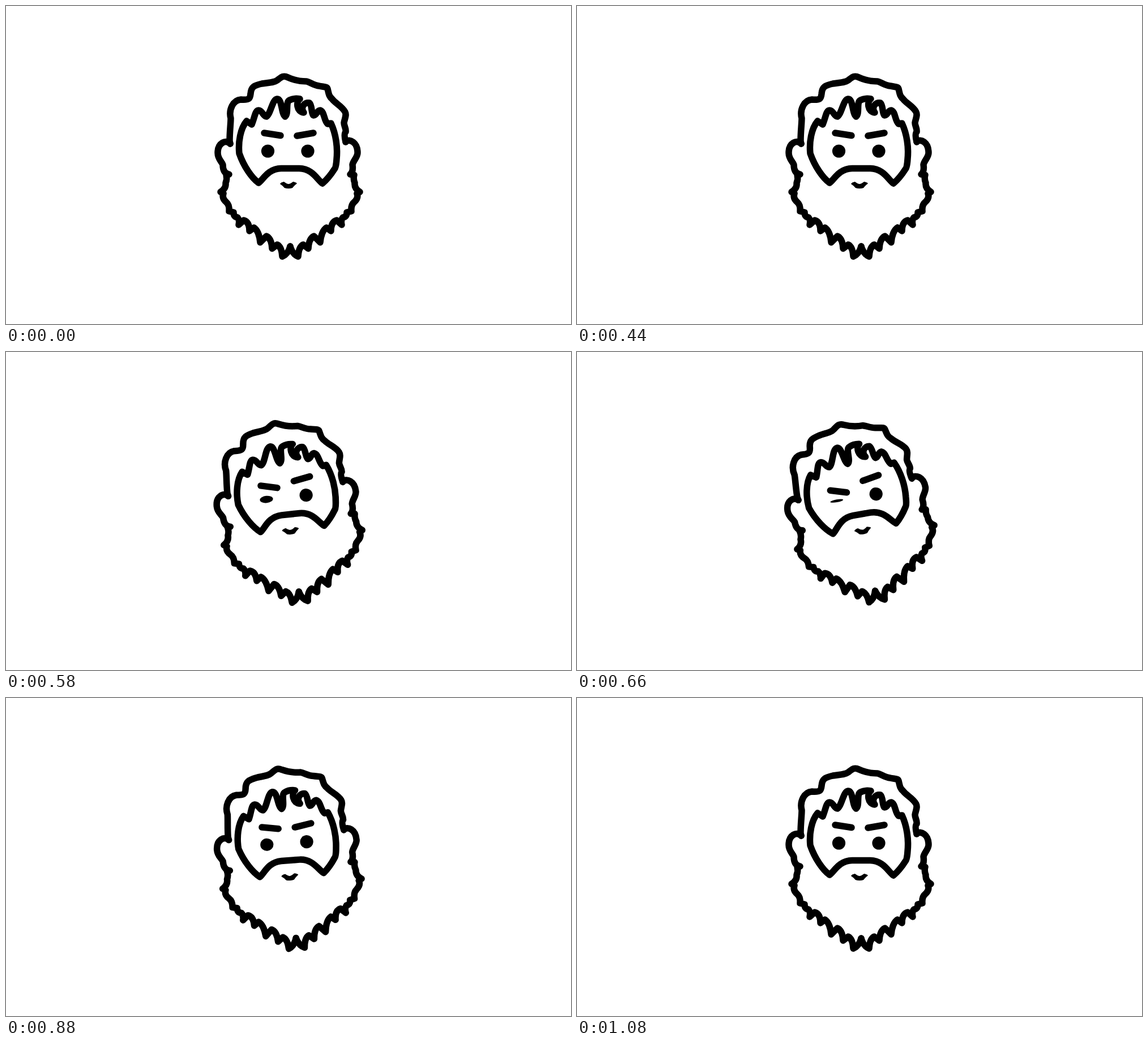
An HTML page that plays this animation: 998 px wide and 561 px high, repeating every 2 s.

```html
<!DOCTYPE html>
<html lang="en">
<head>
<meta charset="utf-8">
<title>Winking bearded man</title>
<style>
html, body { margin: 0; width: 100%; height: 100%; overflow: hidden; background: #fff; }
svg { display: block; width: 100vw; height: 100vh; }
.line { fill: none; stroke: #000; stroke-width: 11.5; stroke-linecap: round; stroke-linejoin: round; }
</style>
</head>
<body>
<svg viewBox="0 0 998 561">
  <g id="head">
    <g class="line">
      <path d="M396 243L395 238C395 222 397 207 397 198C393 183 401 166 415 165C429 166 431 164 432 155C433 142 439 140 452 137C464 135 474 135 479 131C487 125 490 122 498 126C509 131 520 133 531 133C538 135 544 140 553 141C562 143 567 142 568 146C570 154 570 159 576 164C582 172 594 177 599 187C602 193 598 199 597 206C597 212 601 216 600 222C597 225 598 232 600 240"/>
      <path d="M396 243C389 235 374 241 374 259C374 270 381 274 383 280C383 289 386 296 394 297"/>
      <path d="M600 239C607 234 621 240 621 259C621 267 613 273 612 280C613 287 613 293 608 297"/>
      <path d="M446 312C434 303 420 283 412 260C410 240 414 216 425 203L434 209C439 198 440 184 446 184C453 184 454 195 460 195C468 190 470 165 479 164C488 164 486 190 493 195C500 190 493 169 501 166C507 163 514 163 519 164C512 168 513 187 526 188C520 180 526 169 536 171C541 175 539 190 543 193C549 193 549 184 555 184C563 187 561 201 568 208L574 207C583 226 586 250 584 270Q583 286 580 288C573 299 566 307 559 313C550 307 542 287 518 286.500L486 286.500C462 287 454 307 446 312Z"/>
    </g>
    <g class="line" stroke-width="10">
      <path id="beard" d="M389 298Q391 305 388 312Q389 322 379 328L384 331Q381 339 389 346Q395 351 394 362L402 364Q402 372 409 373Q413 378 411 386L420 378Q430 381 430 397L438 391Q447 397 449 417L460 406Q469 410 470 428L479 421Q487 425 488 442Q498 438 502 424"/>
      <use href="#beard" transform="matrix(-1 0 0 1 1004 0)"/>
    </g>
    <path d="M484 314Q485 311 491 310Q496 314 499 314Q502 314 507 310Q513 311 514 313Q509 317 506 321Q503 322 499 322Q495 322 492 321Q489 317 484 314Z"/>
    <path id="brow" class="line" stroke-width="12" d="M456 224L485 228.500"/>
    <path class="line" stroke-width="12" d="M514 229L543 224"/>
    <circle id="eye" cx="462.500" cy="256" r="11.600"/>
    <circle cx="533" cy="256" r="11.600"/>
  </g>
</svg>
<script>
const LOOP = 2000;
const [head, brow, eye] = ['head', 'brow', 'eye'].map(id => document.getElementById(id));

// Steps: [time, value, slope per ms]
const tilt = [[435, 0, 0], [580, 6.1, .056], [672, 10, 0], [800, 7.1, -.037], [980, 1.2, -.021], [1085, 0, 0]];
const wink = [[435, 0, 0], [580, .57, .0062], [668, 1, 0], [800, .36, -.0045], [930, 0, 0]];

function sample(steps, t) {
  if (t <= steps[0][0]) return steps[0][1];
  for (let i = 1; i < steps.length; i++) {
    const [t0, a, va] = steps[i - 1], [t1, b, vb] = steps[i];
    if (t > t1) continue;
    const d = t1 - t0, u = (t - t0) / d, w = 1 - u;
    return w * w * ((1 + 2 * u) * a + u * d * va) + u * u * ((3 - 2 * u) * b - w * d * vb);
  }
  return steps[steps.length - 1][1];
}

function draw(now) {
  const t = now % LOOP, w = sample(wink, t);
  head.setAttribute('transform', `rotate(${-sample(tilt, t)} 499 281)`);
  brow.setAttribute('transform', `translate(${-2 * w} ${14 * w}) rotate(${8 * w} 470.5 226)`);
  eye.setAttribute('transform', `translate(0 256) scale(1 ${1 - .8 * w}) translate(0 -256)`);
}

const start = performance.now();
function tick() {
  draw(performance.now() - start);
  requestAnimationFrame(tick);
}
tick();
</script>
</body>
</html>
```
